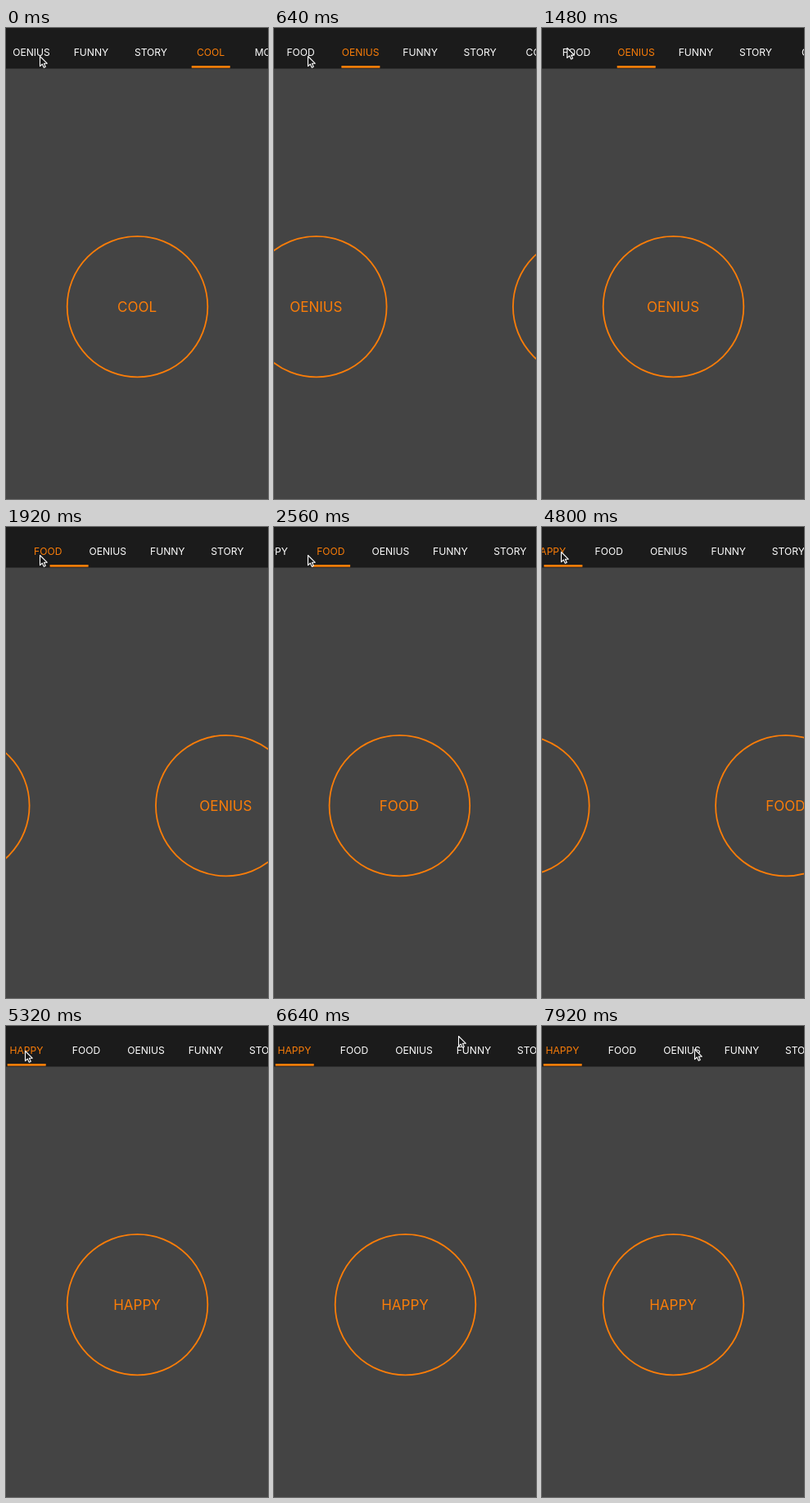
Recreate the animation shown at these times as an HTML page. Size 320 by 574 pixels, loop 8 s.

```html
<!DOCTYPE html>
<html lang="en">
<head>
<meta charset="utf-8">
<title>Tab pager</title>
<style>
  html, body { margin: 0; width: 100%; height: 100%; overflow: hidden; background: #444; }
  svg { display: block; width: 100vw; height: 100vh; }
  text { font-family: Inter, Roboto, sans-serif; text-anchor: middle; }
  .tab { font-size: 12.1px; fill: #fff; }
  .tab.on, .label { fill: #fb7d08; }
  .label { font-size: 17px; }
  .ring { fill: none; stroke: #fb7d08; stroke-width: 1.8; }
</style>
</head>
<body>
<svg viewBox="0 0 320 574">
  <rect width="320" height="574" fill="#444"/>
  <g id="pages"></g>
  <rect width="320" height="49.5" fill="#1b1b1b"/>
  <g id="tabs"></g>
  <path id="cursor" d="M.5 .5V12.6L3.3 10 5.3 14.2 7.3 13.3 5.4 9.2H9.2Z"
        fill="#161616" stroke="#fff" stroke-width="1.1" stroke-linejoin="round"/>
</svg>
<script>
const LOOP = 8000;
const NAMES = ["HAPPY", "FOOD", "OENIUS", "FUNNY", "STORY", "COOL", "MOVIE"];
const FIRST_TAB = 25, TAB_GAP = 73, TAB_SCROLL = 28;
const PAGE_X = 160.5, PAGE_Y = 339.6, PAGE_GAP = 326;

const clamp = v => Math.min(1, Math.max(0, v));
const sine = v => (1 - Math.cos(Math.PI * clamp(v))) / 2;
const glide = ms => t => sine(t / ms);
const spring = rate => t => {
  const x = Math.max(0, t) * rate / 1000;
  return 1 - (1 + x) * Math.exp(-x);
};

// Each tap moves the pages and the underline with its own timing.
const START = 5;
const taps = [
  { at: 40, to: 2, page: glide(767), line: glide(507) },
  { at: 1754, to: 1, page: spring(7.1), line: glide(280) },
  { at: 4456, to: 0, page: glide(767), line: glide(507) }
];

// time, x, y of the pointer tip
const pointer = [
  [0, 41, 34], [900, 41, 34], [1220, 21, 15], [1300, 21, 15], [1680, 41, 34],
  [3520, 41, 34], [3960, 23, 30], [5580, 23, 30], [6400, 225, 22],
  [6600, 225, 12], [7270, 225, 12], [7900, 186, 28], [LOOP, 186, 28]
];

function add(parent, tag, attrs, text = "") {
  const el = document.createElementNS("http://www.w3.org/2000/svg", tag);
  for (const key in attrs) el.setAttribute(key, attrs[key]);
  el.textContent = text;
  return parent.appendChild(el);
}

const move = (el, x, y = 0) => el.setAttribute("transform", `translate(${x.toFixed(3)} ${y.toFixed(3)})`);
const [pages, tabs, cursor] = ["pages", "tabs", "cursor"].map(id => document.getElementById(id));

const tabEls = NAMES.map((name, i) => {
  const x = PAGE_X + i * PAGE_GAP;
  add(pages, "circle", { class: "ring", cx: x, cy: PAGE_Y, r: 85.8 });
  add(pages, "text", { class: "label", x: x - 0.5, y: 346 }, name);
  return add(tabs, "text", { class: "tab", x: FIRST_TAB + i * TAB_GAP, y: 34.1 }, name);
});
const underline = add(tabs, "rect", { x: FIRST_TAB - 23.3, y: 46, width: 47, height: 2.7, fill: "#fb7d08" });

function track(t, part) {
  let pos = START;
  for (const tap of taps) pos += (tap.to - pos) * tap[part](t - tap.at);
  return pos;
}

function pointerAt(t) {
  const i = pointer.findIndex(k => k[0] > t);
  const [t0, x0, y0] = pointer[i - 1], [t1, x1, y1] = pointer[i];
  const k = sine((t - t0) / (t1 - t0));
  return [x0 + (x1 - x0) * k, y0 + (y1 - y0) * k];
}

function draw(t) {
  const pos = track(t, "page");
  const selected = taps.reduce((now, tap) => t >= tap.at ? tap.to : now, START);
  move(pages, -pos * PAGE_GAP);
  move(tabs, -pos * TAB_SCROLL);
  move(underline, track(t, "line") * TAB_GAP);
  tabEls.forEach((el, i) => el.classList.toggle("on", i === selected));
  move(cursor, ...pointerAt(t));
}

function frame() {
  draw(performance.now() % LOOP);
  requestAnimationFrame(frame);
}
frame();
</script>
</body>
</html>
```
